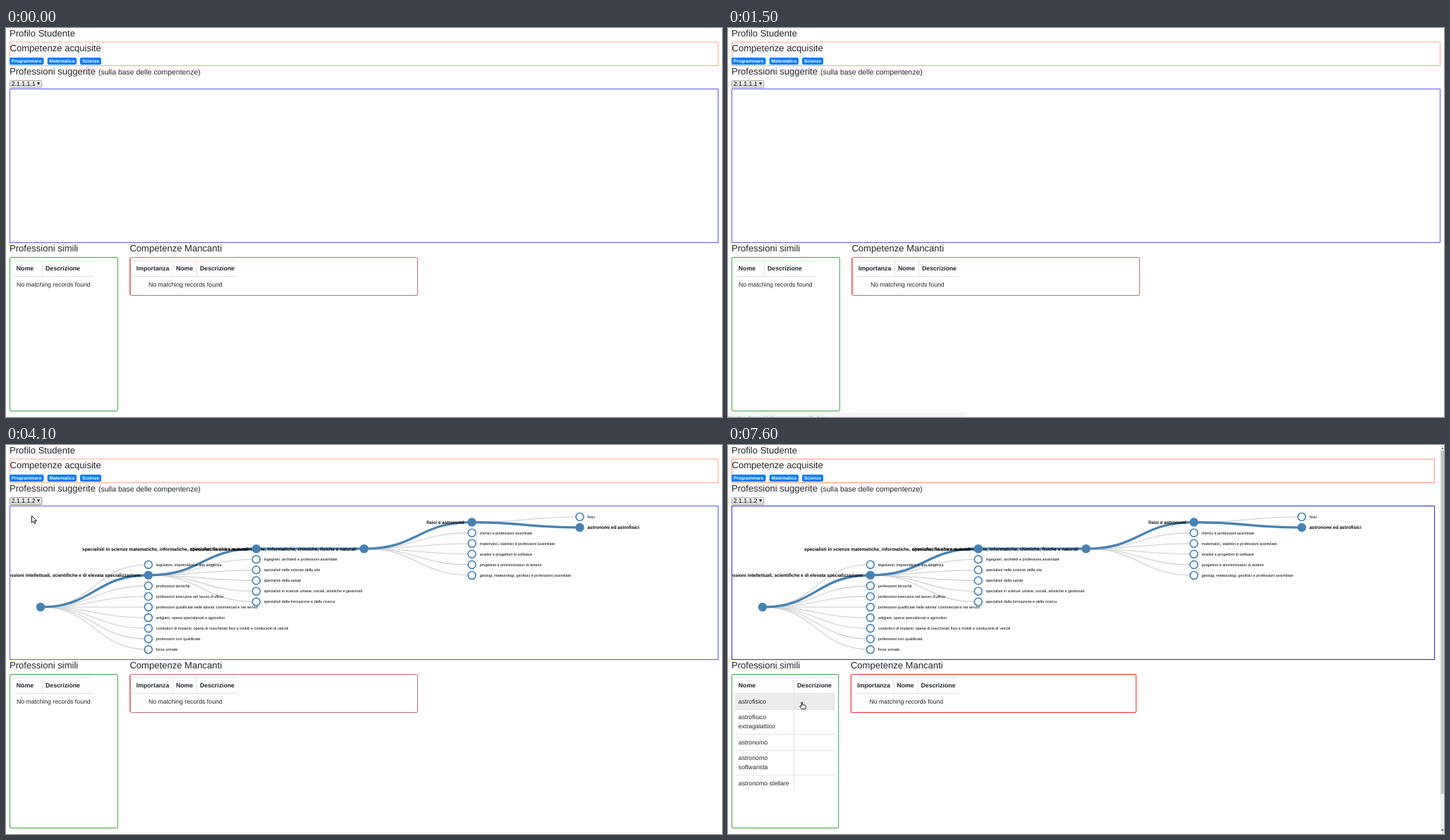
Animation, 1015 px wide and 552 px high, one loop 8 s. Source, as an HTML page:

```html
<!DOCTYPE html>
<html lang="it">
<head>
<meta charset="utf-8">
<title>Profilo Studente</title>
<style>
  html, body { margin: 0; width: 100%; height: 100%; overflow: hidden; background: #fff; }
  svg { display: block; }
  text { font-family: "Liberation Sans", Arial, sans-serif; text-rendering: geometricPrecision; }
  .popup { filter: drop-shadow(0 1px 2px #0009); }
</style>
</head>
<body>
<svg id="stage" width="1015" height="552" viewBox="0 0 1015 552"></svg>
<script>
const LOOP = 8000, STEP = 100;
const HEAD = 13.07, BODY = 8.72, BOLD = 6.53, SMALL = 5.45;
const INK = '#212529', STEEL = 'steelblue', RULE = '#dee2e6';
const stage = document.getElementById('stage');

const text = (x, y, str, size = BODY, attrs = '', fill = INK) =>
  `<text x="${x}" y="${y}" font-size="${size}" fill="${fill}" ${attrs}>${str.replace(/&/g, '&amp;')}</text>`;
const bold = (x, y, str, size = BODY, fill = INK, attrs = '') =>
  text(x, y, str, size, 'font-weight="bold" ' + attrs, fill);
const box = (x, y, right, bottom, attrs) =>
  `<rect x="${x}" y="${y}" width="${right - x}" height="${bottom - y}" ${attrs}/>`;
const frame = (x, y, right, bottom, color, alpha, rx = 0) =>
  box(x, y, right, bottom, `fill="none" stroke="${color}" stroke-opacity="${alpha}" rx="${rx}"`);
const path = (d, stroke, width, fill = 'none') =>
  `<path d="${d}" stroke="${stroke}" stroke-width="${width}" fill="${fill}"/>`;
const rules = d => path(d, RULE, .9);

const codes = ('2.1.1.1.1 2.1.1.1.2 2.1.1.3.1 2.1.1.5.1 2.1.1.6.3 2.1.1.6.4 2.2.1.3.0 2.2.1.4.1 2.2.1.4.2 ' +
  '2.2.1.4.3 2.3.1.1.3 2.6.1.3.2 2.6.2.1.2 2.6.2.3.2 2.6.2.6.0 3.1.1.1.2 3.1.2.1.0 3.1.3.4.0').split(' ');

const sciences = 'specialisti in scienze matematiche, informatiche, chimiche, fisiche e naturali';
// One entry per depth: first y, index of the chosen node, labels.
const levels = [
  [230, 0, ['']],
  [169.7, 1, ['legislatori, imprenditori e alta dirigenza',
    'professioni intellettuali, scientifiche e di elevata specializzazione', 'professioni tecniche',
    "professioni esecutive nel lavoro d'ufficio",
    "professioni qualificate nelle attivita' commerciali e nei servizi",
    'artigiani, operai specializzati e agricoltori',
    'conduttori di impianti, operai di macchinari fissi e mobili e conducenti di veicoli',
    'professioni non qualificate', 'forze armate']],
  [147.2, 0, [sciences, 'ingegneri, architetti e professioni assimilate', 'specialisti nelle scienze della vita',
    'specialisti della salute', 'specialisti in scienze umane, sociali, artistiche e gestionali',
    'specialisti della formazione e della ricerca']],
  [147.2, 0, [sciences]],
  [109.6, 0, ['fisici e astronomi', 'chimici e professioni assimilate',
    'matematici, statistici e professioni assimilate', 'analisti e progettisti di software',
    'progettisti e amministratori di sistemi', 'geologi, meteorologi, geofisici e professioni assimilate']],
  [102, 1, ['fisici', 'astronomi ed astrofisici']]
];

function buildTree() {
  let grey = '', blue = '', nodes = '';
  levels.forEach(([top, chosen, labels], depth) => {
    const x = 49 + 152.87 * depth, px = x - 152.87, mid = (x + px) / 2;
    let group = '';
    labels.forEach((label, i) => {
      const y = top + 15.07 * i, on = i === chosen;
      if (depth) {
        const [parentTop, parentIndex] = levels[depth - 1], py = parentTop + 15.07 * parentIndex;
        const d = `M${px} ${py}C${mid} ${py} ${mid} ${y} ${x} ${y}`;
        if (on) blue += path(d, STEEL, 3.3); else grey += path(d, '#ccc', 1.1);
      }
      group += `<circle cx="${x}" cy="${y}" r="5.45" stroke="${STEEL}" stroke-width="1.63" fill="${on ? STEEL : '#fff'}"/>`;
      const left = on && depth < 5;
      group += on
        ? bold(x + (left ? -10.9 : 10.9), y + 2.3, label, BOLD, '#000', left ? 'text-anchor="end"' : '')
        : text(x + 10.9, y + 1.9, label, SMALL, '', '#000');
    });
    nodes = group + nodes;
  });
  return `<svg x="6" y="87" width="1003" height="217" viewBox="6 87 1003 217">${grey + blue + nodes}</svg>`;
}
const tree = buildTree();

const badge = (x, right, label) =>
  box(x, 42, right, 52, 'rx="2.2" fill="#007bff"') + bold(x + 2.9, 49.3, label, BOLD, '#fff');

function select(label, right, focused) {
  const ax = right - 4.7;
  return box(5.5, 74.5, right, 84.7, `rx="1" fill="url(#button)" stroke="${focused ? '#858585' : '#a5a5a5'}" stroke-width=".9"`) +
    text(7.7, 82.3, label, BODY, '', '#000') +
    `<path d="M${ax - 2.1} 77.3h4.2l-2.1 3.8z" fill="#111"/>`;
}

function menu(active) {
  const rows = codes.map((code, i) => {
    const y = 85.2 + 11.03 * i, on = i === active;
    return (on ? box(5.3, y, 50.8, y + 11.03, 'fill="#86a34c"') : '') +
      text(7.7, y + 8.4, code, BODY, '', on ? '#fff' : '#111');
  });
  return `<g class="popup">${box(5, 85, 51, 285, 'fill="#fafafa" stroke="#999" stroke-width=".5"')}</g>` + rows.join('');
}

function similarEmpty() {
  return rules('M10 330.5H124M10 352.5H124M51.5 330V352') +
    bold(14.8, 344.4, 'Nome') + bold(56, 344.4, 'Descrizione') + text(15, 367, 'No matching records found');
}

function similarJobs(hover) {
  const lines = [[363.8, 'astrofisico'], [386.2, 'astrofisico'], [399.3, 'extragalattico'], [421.8, 'astronomo'],
    [444.2, 'astronomo'], [457.3, 'softwarista'], [479.7, 'astronomo stellare']];
  return (hover ? box(10, 353, 152, 375, 'fill="#ececec"') : '') +
    rules('M10 330.5H152M10 352.5H152M10 375.5H152M10 410.5H152M10 433.5H152M10 468.5H152M93.5 330V490') +
    bold(14.8, 344.4, 'Nome') + bold(98, 344.4, 'Descrizione') +
    lines.map(([y, s]) => text(14.8, y + 3.1, s)).join('');
}

function missing(right, color, alpha) {
  return text(175.4, 317.1, 'Competenze Mancanti', HEAD) +
    frame(175.9, 325.5, right, 379.5, color, alpha, 1.5) + path('M175.9 327V378', '#ff2a2a', 1) +
    rules('M180.5 330.5H328M180.5 352.5H328M236.7 330V352M270.5 330V352') +
    bold(184.8, 344.4, 'Importanza') + bold(241, 344.4, 'Nome') + bold(275, 344.4, 'Descrizione') +
    text(202, 367, 'No matching records found');
}

function tooltip() {
  const line = (y, str, gap) => text(818.3, y, str, BOLD, `style="word-spacing:${gap}px"`);
  return `<g class="popup">${box(813.5, 119, 1040, 167.3, 'fill="#fff"')}</g>` +
    bold(818.3, 129.5, 'Astronomi ed astrofisici', BOLD) +
    line(137.3, 'Le professioni comprese in questa unit&agrave; conducono ricerche', 3.1) +
    line(145, 'astronomici, individuano e applicano metodi di indagine, formulano', 1.2) +
    line(152.8, 'base di osservazioni e di esperimenti, incrementano la conoscenza', .1);
}

function scrollbar() {
  return box(1009.5, 0, 1015, 552, 'fill="#f1f1f1"') + box(1010.3, 8, 1015, 495, 'fill="#c1c1c1"') +
    box(0, 551, 1010, 552, 'fill="#eee"') +
    '<path d="M1010.8 6l2-2.4 2 2.4z" fill="#888"/><path d="M1010.8 545.5l2 2.4 2-2.4z" fill="#444"/>';
}

function status(alpha) {
  return `<g opacity="${alpha}">${box(-4, 546.3, 336.5, 570, 'rx="2.5" fill="#eee" stroke="#ddd" stroke-width=".6"')}` +
    text(.5, 555.6, 'Waiting for publiclessonsroom.github.io…', 8, '', '#666') + '</g>';
}

const shapes = {
  arrow: 'M.5 .5V10.3L2.8 8.2 4.4 11.7 6 11 4.5 7.5H7.6Z',
  hand: 'M3 1.3Q3.8 .2 4.6 1.3V4.6L8.2 5.3Q9.8 5.8 9.5 7.4L8.6 10.7H3.6L.7 7.4Q.7 6 2 6.5L3 7.2Z'
};
// Start time, x, y, shape.
const stops = [[2500, 37, 79.5], [3600, 36, 100], [4500, 37, 100], [4900, 575, 113], [5300, 786, 115],
  [5800, 812, 116, 'hand'], [7000, 480, 177], [7600, 101, 364, 'hand']];

function cursor(t) {
  if (t < 2000) return '';
  const k = (t - 2000) / 500;
  const [, x, y, shape = 'arrow'] = t < 2500 ? [0, 30 + 7 * k, 79.5 * k] : stops.filter(s => s[0] <= t).pop();
  return `<g transform="translate(${x} ${y})">${path(shapes[shape], '#000', .9, '#fff')}</g>`;
}

function draw(t) {
  const loading = t >= 1000 && t < 1400, chosen = t >= 4100, loaded = t >= 6600;
  const open = t >= 3200 && t < 4100, focused = t >= 3200 && t < 6200;
  const strong = loading || loaded, alpha = strong ? .85 : .65;
  const right = loaded ? 1001.5 : 1009.5;
  const fade = t < 1000 ? 0 : t < 1400 ? Math.min(1, (t - 900) / 300) : Math.max(0, (1700 - t) / 400);

  const page = text(5, 65.7, 'Professioni suggerite', HEAD) + text(131, 65.7, '(sulla base delle compentenze)', 10.46) +
    (loading ? select('2.2.2.2.0 - Cartografi e fotogrammetristi', 178.3, false)
             : select(codes[+chosen], 50.8, focused)) +
    (chosen ? tree : '') + frame(5.5, 86.5, right, 304.5, '#00f', alpha) +
    text(5, 317.1, 'Professioni simili', HEAD) +
    frame(5.5, 325.5, loaded ? 156.7 : 158.3, 543.5, 'green', .75, 1.5) +
    (loaded ? similarJobs(t >= 7600) : similarEmpty()) +
    `<g transform="translate(${loaded ? -1.5 : 0})">` +
    missing(loaded ? 580 : 583.5, strong ? '#f00' : '#a0202c', alpha) + '</g>';

  stage.innerHTML =
    '<linearGradient id="button" x2="0" y2="1"><stop stop-color="#f2f2f2"/><stop offset="1" stop-color="#dadada"/></linearGradient>' +
    text(5, 12, 'Profilo Studente', HEAD) +
    frame(5.5, 20, right, loading ? 40.5 : 53.5, 'coral', alpha) + text(5.5, 32.5, 'Competenze acquisite', HEAD) +
    (loading ? '' : badge(5, 53.5, 'Programmare') + badge(58.7, 100, 'Matematica') + badge(105, 135, 'Scienze')) +
    `<g transform="translate(0 ${loading ? -13 : 0})">${page}</g>` +
    (open ? menu(t < 3600 ? 0 : 1) : '') +
    (t >= 5800 && t < 7000 ? tooltip() : '') +
    (loaded ? scrollbar() : '') + (fade ? status(fade) : '') + cursor(t);
}

let shown = -1;
function tick() {
  const t = Math.floor(performance.now() % LOOP / STEP) * STEP;
  if (t !== shown) draw(shown = t);
  requestAnimationFrame(tick);
}
tick();
</script>
</body>
</html>
```
